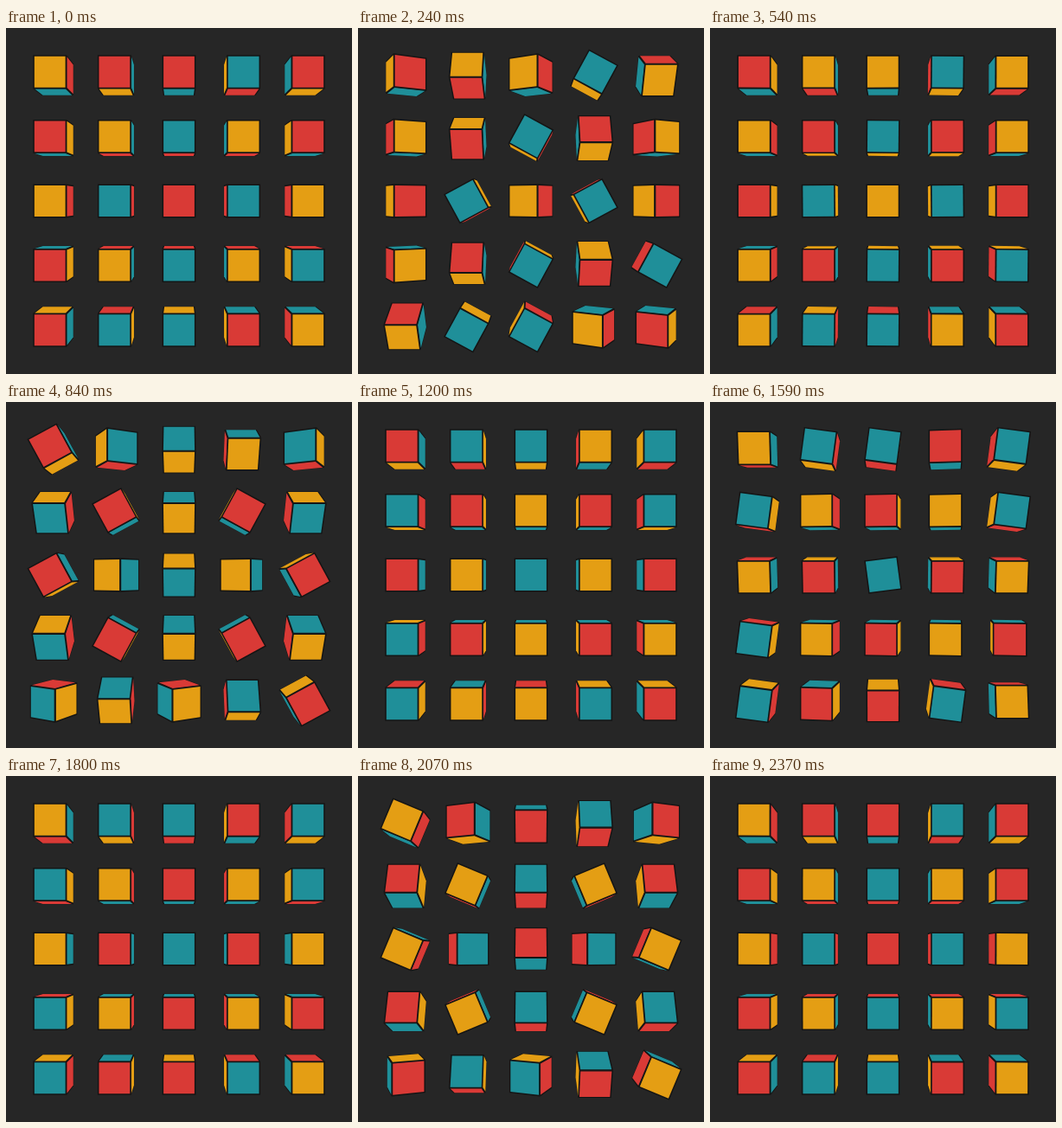
An HTML page with a canvas that plays this animation: 400 by 400 pixels, repeating every 2.4 s.

```html
<!DOCTYPE html>
<html lang="en">
<head>
<meta charset="utf-8">
<title>Turning cubes</title>
<style>
  html, body { margin: 0; width: 100%; height: 100%; overflow: hidden; background: #262626; }
  canvas { display: block; width: 400px; height: 400px; }
</style>
</head>
<body>
<canvas></canvas>
<script>
const STAGE = 400, LOOP = 2400, TURN = 600, STEP = 30;
const HALF = 18.8, BORDER = 1.45, PITCH = 72.3, CAMERA = 600;
const BG = '#262626', LINE = '#141414';
const COLORS = ['#1f8f99', '#d93a36', '#e49e14']; // body axes 0, 1, 2
const TURN_AXES = [0, 1, 0, 2];

// Direction of body axes 0 and 2 for each cube; capitals point backwards.
const GRID = [
  'Yz XY yX Zx xy',
  'Yx xz Zx XZ Yx',
  'Yz zy yx zy Yz',
  'Yx XZ Zx xz Zx',
  'xy Zx ZY yX yz'
];

const dot = (a, b) => a[0] * b[0] + a[1] * b[1] + a[2] * b[2];
const cross = (a, b) => [
  a[1] * b[2] - a[2] * b[1],
  a[2] * b[0] - a[0] * b[2],
  a[0] * b[1] - a[1] * b[0]
];
const mix = (a, p, b, q) => a.map((v, i) => v * p + b[i] * q);

function unit(letter) {
  const low = letter.toLowerCase();
  return ['x', 'y', 'z'].map(n => n === low ? (low === letter ? 1 : -1) : 0);
}

const cubes = GRID.flatMap((row, r) => row.split(' ').map((code, c) => {
  const first = unit(code[0]), last = unit(code[1]);
  return {
    pos: [(c - 2) * PITCH, (r - 2) * PITCH, 0],
    axes: [first, cross(last, first), last]
  };
}));

// cubic-bezier(.25, .1, .25, 1)
function ease(x) {
  let lo = 0, hi = 1;
  for (let i = 0; i < 30; i++) {
    const s = (lo + hi) / 2;
    if (0.75 * s * (1 - s) + s ** 3 < x) lo = s; else hi = s;
  }
  const s = lo, q = 1 - s;
  return 0.3 * q * q * s + 3 * q * s * s + s ** 3;
}

// Turns a body frame around its own axis k.
function turn(axes, k, angle) {
  const i = (k + 1) % 3, j = (k + 2) % 3;
  const c = Math.cos(angle), s = Math.sin(angle);
  const out = axes.slice();
  out[i] = mix(axes[i], c, axes[j], s);
  out[j] = mix(axes[j], c, axes[i], -s);
  return out;
}

const canvas = document.querySelector('canvas');
const ratio = window.devicePixelRatio || 1;
canvas.width = canvas.height = STAGE * ratio;
const ctx = canvas.getContext('2d');
ctx.scale(ratio, ratio);

function project(p) {
  const k = CAMERA / (CAMERA - p[2]);
  return [STAGE / 2 + p[0] * k, STAGE / 2 + p[1] * k];
}

function fillSquare(center, u, v, half, color) {
  ctx.beginPath();
  for (const [a, b] of [[-1, -1], [1, -1], [1, 1], [-1, 1]]) {
    ctx.lineTo(...project(mix(center, 1, mix(u, a, v, b), half)));
  }
  ctx.fillStyle = color;
  ctx.fill();
}

// Each face is a dark square with a coloured one inset in its plane.
function drawCube(pos, axes) {
  const eye = mix([0, 0, CAMERA], 1, pos, -1);
  axes.forEach((axis, k) => {
    const facing = dot(axis, eye);
    if (Math.abs(facing) <= HALF) return;
    const center = mix(pos, 1, axis, Math.sign(facing) * HALF);
    const u = axes[(k + 1) % 3], v = axes[(k + 2) % 3];
    fillSquare(center, u, v, HALF, LINE);
    fillSquare(center, u, v, HALF - BORDER, COLORS[k]);
  });
}

function draw(time) {
  const t = Math.floor((time % LOOP) / STEP) * STEP;
  const current = Math.floor(t / TURN);
  const partial = ease((t % TURN) / TURN);
  ctx.fillStyle = BG;
  ctx.fillRect(0, 0, STAGE, STAGE);
  for (const { pos, axes } of cubes) {
    let frame = axes;
    for (let n = 0; n <= current; n++) {
      const amount = n < current ? 1 : partial;
      frame = turn(frame, TURN_AXES[n], amount * Math.PI / 2);
    }
    drawCube(pos, frame);
  }
}

const start = performance.now();
function tick(now) {
  draw(Math.max(0, now - start));
  requestAnimationFrame(tick);
}
draw(0);
requestAnimationFrame(tick);
</script>
</body>
</html>
```
